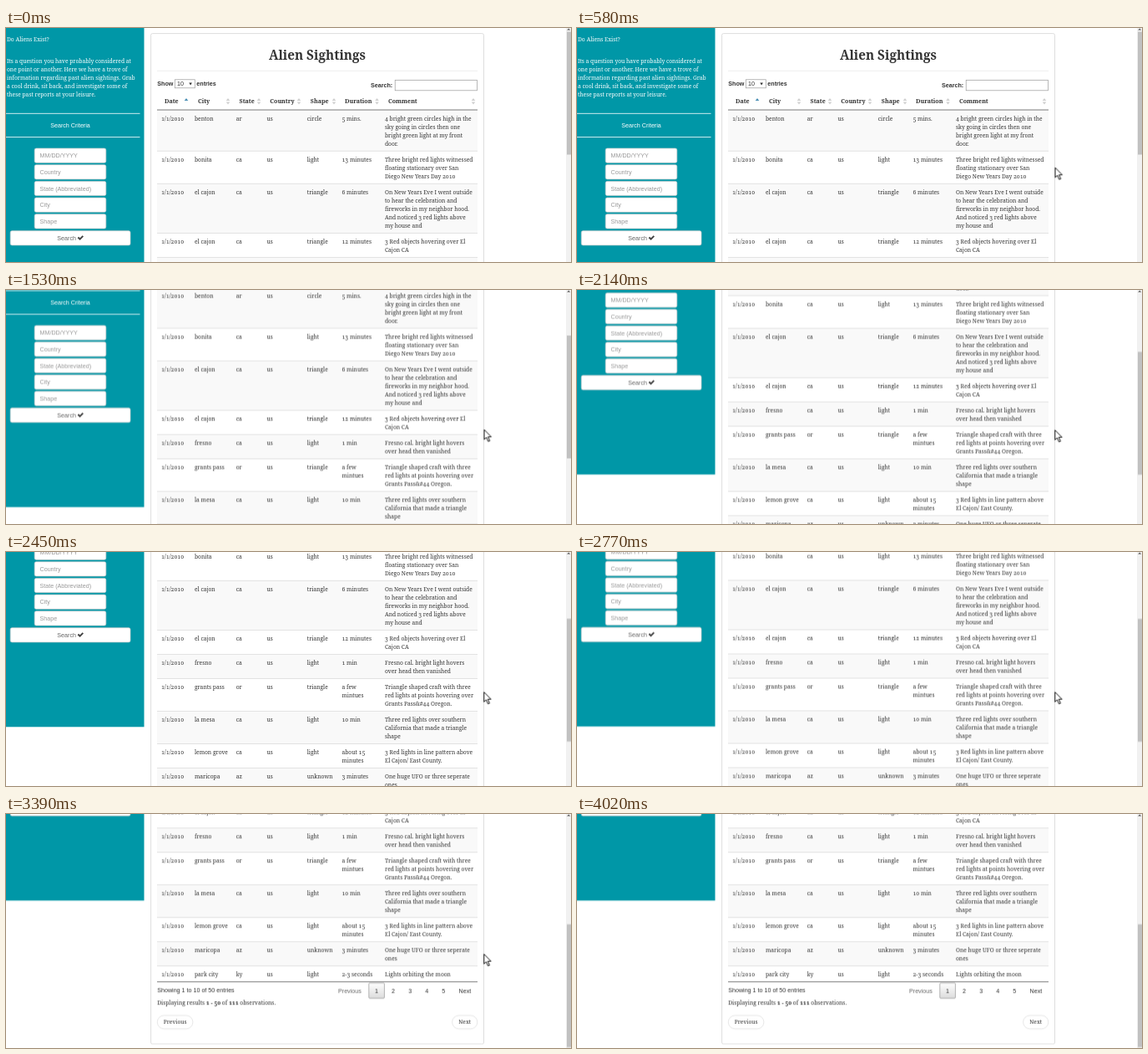
Write an HTML page that moves like this. It is 677 px wide and 280 px high and loops after 4.17 s.

```html
<!DOCTYPE html>
<html lang="en">
<head>
<meta charset="utf-8">
<title>Alien Sightings</title>
<style>
html, body { margin: 0; width: 100%; height: 100%; overflow: hidden; background: #fff; }
svg { display: block; width: 677px; height: 280px; }
text { font: 7.15px "Liberation Sans", Arial, sans-serif; fill: #333; white-space: pre; }
.serif { font: 6.7px "Noto Serif", Georgia, serif; font-variant-numeric: oldstyle-nums; }
.head { font-size: 7.1px; font-weight: 700; }
.title { font-size: 15.3px; font-weight: 700; }
.bold { font-weight: 700; }
.white { fill: #fff; }
.hint { fill: #999; }
.soft { fill: #666; }
.mid { text-anchor: middle; }
#page, #thumb, #cursor { animation: 4170ms step-end infinite; }
#page { animation-name: page; }
#thumb { animation-name: thumb; }
#cursor { animation-name: cursor; }
@keyframes page {
  0% { transform: translateY(0); }
  21.583% { transform: translateY(-50.7px); }
  36.691% { transform: translateY(-101.5px); }
  51.319% { transform: translateY(-140.5px); }
  58.753% { transform: translateY(-152px); }
  66.427% { transform: translateY(-152.5px); }
  73.621% { transform: translateY(-202.7px); }
  81.295%, 100% { transform: translateY(-257.7px); }
}
@keyframes thumb {
  0% { transform: translateY(0); }
  21.583% { transform: translateY(25px); }
  36.691% { transform: translateY(50px); }
  51.319% { transform: translateY(69.5px); }
  58.753% { transform: translateY(75.3px); }
  66.427% { transform: translateY(75.5px); }
  73.621% { transform: translateY(100.5px); }
  81.295%, 100% { transform: translateY(127.5px); }
}
@keyframes cursor {
  0% { transform: translate(608px, 207px); opacity: 0; }
  6.475% { transform: translate(608px, 207px); opacity: 1; }
  13.909% { transform: translate(572.5px, 166.3px); opacity: 1; }
  51.319% { transform: translate(572.2px, 166.7px); opacity: 1; }
  96.403%, 100% { transform: translate(572.2px, 166.7px); opacity: 0; }
}
</style>
</head>
<body>
<svg viewBox="0 0 677 280">
  <defs>
    <linearGradient id="btn" x2="0" y2="1">
      <stop stop-color="#fff"/><stop offset="1" stop-color="#dcdcdc"/>
    </linearGradient>
  </defs>
  <g id="page"></g>
  <rect x="671" width="6" height="280" fill="#f1f1f1"/>
  <path d="M672.2 2.6h4l-2-2.2z" fill="#555"/>
  <rect id="thumb" x="672" y="4.5" width="5" height="147" fill="#c1c1c1"/>
  <path id="cursor" d="M.5.8V12.6L3.2 10.1 5.3 15 7.2 14.2 5.1 9.4H8.9Z" fill="#fff" stroke="#000" stroke-width=".9"/>
</svg>
<script>
const page = document.getElementById('page');

function add(tag, attrs, str) {
  const el = document.createElementNS('http://www.w3.org/2000/svg', tag);
  for (const k in attrs) el.setAttribute(k, attrs[k]);
  if (str !== undefined) el.textContent = str;
  page.append(el);
  return el;
}
const text = (x, y, str, cls = '') => add('text', { x, y, class: cls }, str);
const box = (x, y, width, height, fill, stroke = 'none', rx = 0) =>
  add('rect', { x, y, width, height, fill, stroke, rx, 'stroke-width': 0.7 });
const rule = (x, y, w, fill, h = 0.7) => box(x, y - h / 2, w, h, fill);
const shape = (d, fill) => add('path', { d, fill });

function sidebar() {
  box(0, 0, 165.5, 361.3, '#0097a7');
  text(1, 16.3, 'Do Aliens Exist?', 'serif white');
  [
    'Its a question you have probably considered at',
    'one point or another. Here we have a trove of',
    'information regarding past alien sightings. Grab',
    'a cool drink, sit back, and investigate some of',
    'these past reports at your leisure.'
  ].forEach((line, i) => text(1, 41.6 + i * 10.1, line, 'serif white'));
  rule(0, 102.3, 160.5, '#e4f4f6', 0.9);
  rule(0, 130.6, 160.5, '#e4f4f6', 0.9);
  text(77, 119.3, 'Search Criteria', 'white mid');
  ['MM/DD/YYYY', 'Country', 'State (Abbreviated)', 'City', 'Shape'].forEach((hint, i) => {
    const y = 144 + i * 19.7;
    box(34.2, y, 85.6, 17.2, '#fff', '#ccc', 2);
    text(40.5, y + 11.1, hint, 'hint');
  });
  box(5.2, 242.7, 143.8, 17.2, '#fff', '#ccc', 2);
  text(61.3, 253.8, 'Search', 'soft');
  shape('M85.6 251.3l1.5-1.5 1.5 1.5 3-3.1 1.4 1.4-4.4 4.5z', '#444');
}

function sorter(x, active) {
  shape(`M${x - 2.3} 87h4.6l-2.3-3z`, active ? '#4a8fb5' : '#d0d0d0');
  if (!active) shape(`M${x - 2.3} 88.6h4.6l-2.3 3z`, '#d0d0d0');
}

function tableHead() {
  text(373, 38.2, 'Alien Sightings', 'serif title mid');
  rule(181, 51.2, 384, '#e6e6e6');
  text(181.3, 69.3, 'Show', 'bold');
  box(202.3, 61.8, 24, 10, '#fff', '#999');
  text(205, 69.4, '10');
  shape('M219.3 65.6h3.6l-1.8 2.8z', '#333');
  text(228.3, 69.3, 'entries', 'bold');
  text(437, 71.2, 'Search:', 'bold');
  box(466.2, 62.3, 98.2, 12.5, '#fff', '#999');
  [
    ['Date', 190, 216], ['City', 230, 266], ['State', 279.5, 303], ['Country', 316.3, 351],
    ['Shape', 364.8, 393], ['Duration', 406, 444.5], ['Comment', 458, 560]
  ].forEach(([name, x, icon], i) => {
    text(x, 90.4, name, 'serif head');
    sorter(icon, i === 0);
  });
}

const cols = [186, 226, 275.7, 312.5, 360.8, 402.5, 454];
const rows = [
  'benton|ar|circle|5 mins.|4 bright green circles high in the/sky going in circles then one/bright green light at my front/door.',
  'bonita|ca|light|13 minutes|Three bright red lights witnessed/floating stationary over San/Diego New Years Day 2010',
  'el cajon|ca|triangle|6 minutes|On New Years Eve I went outside/to hear the celebration and/fireworks in my neighbor hood./And noticed 3 red lights above/my house and',
  'el cajon|ca|triangle|12 minutes|3 Red objects hovering over El/Cajon CA',
  'fresno|ca|light|1 min|Fresno cal. bright light hovers/over head then vanished',
  'grants pass|or|triangle|a few/mintues|Triangle shaped craft with three/red lights at points hovering over/Grants Pass&#44 Oregon.',
  'la mesa|ca|light|10 min|Three red lights over southern/California that made a triangle/shape',
  'lemon grove|ca|light|about 15/minutes|3 Red lights in line pattern above/El Cajon~ East County.',
  'maricopa|az|unknown|3 minutes|One huge UFO or three seperate/ones',
  'park city|ky|light|2-3 seconds|Lights orbiting the moon'
];

function tableBody() {
  const lead = 10.1;
  let top = 98;
  rows.forEach((row, i) => {
    const [city, state, form, time, note] = row.split('|');
    const height = 8.78 + note.split('/').length * lead;
    if (i % 2 === 0) box(181, top, 384, height, '#f9f9f9');
    if (i) rule(181, top, 384, '#d8d8d8');
    text(cols[0], top + 12.5, '1/1/2010', 'serif');
    [city, state, 'us', form, time, note].forEach((cell, c) =>
      cell.split('/').forEach((line, n) =>
        text(cols[c + 1], top + 12.5 + n * lead, line.replace('~', '/'), 'serif')));
    top += height;
  });
  rule(181, 98, 384, '#444');
  rule(181, top, 384, '#444');
}

function footer() {
  text(181.2, 471.3, 'Showing 1 to 10 of 50 entries');
  text(398, 471.5, 'Previous', 'soft');
  box(434.8, 460, 18.6, 18.2, 'url(#btn)', '#979797', 1);
  for (let n = 1; n <= 5; n++) text(424 + n * 20.05, 471.5, n, 'mid');
  text(542.5, 471.5, 'Next');
  const sum = text(181.2, 486.1, '', 'serif');
  ['Displaying results ', '1 - 50', ' of ', '111', ' observations.'].forEach((part, i) => {
    const span = add('tspan', i % 2 ? { class: 'bold' } : {}, part);
    sum.append(span);
  });
  box(181.3, 498.8, 42.6, 16, '#fff', '#ddd', 8);
  text(202.6, 509.3, 'Previous', 'serif mid');
  box(534.6, 498.8, 30.2, 16, '#fff', '#ddd', 8);
  text(549.7, 509.3, 'Next', 'serif mid');
}

sidebar();
box(173.6, 6.6, 398.9, 526.4, '#fff', '#d0d0d0', 2);
tableHead();
tableBody();
footer();
</script>
</body>
</html>
```
